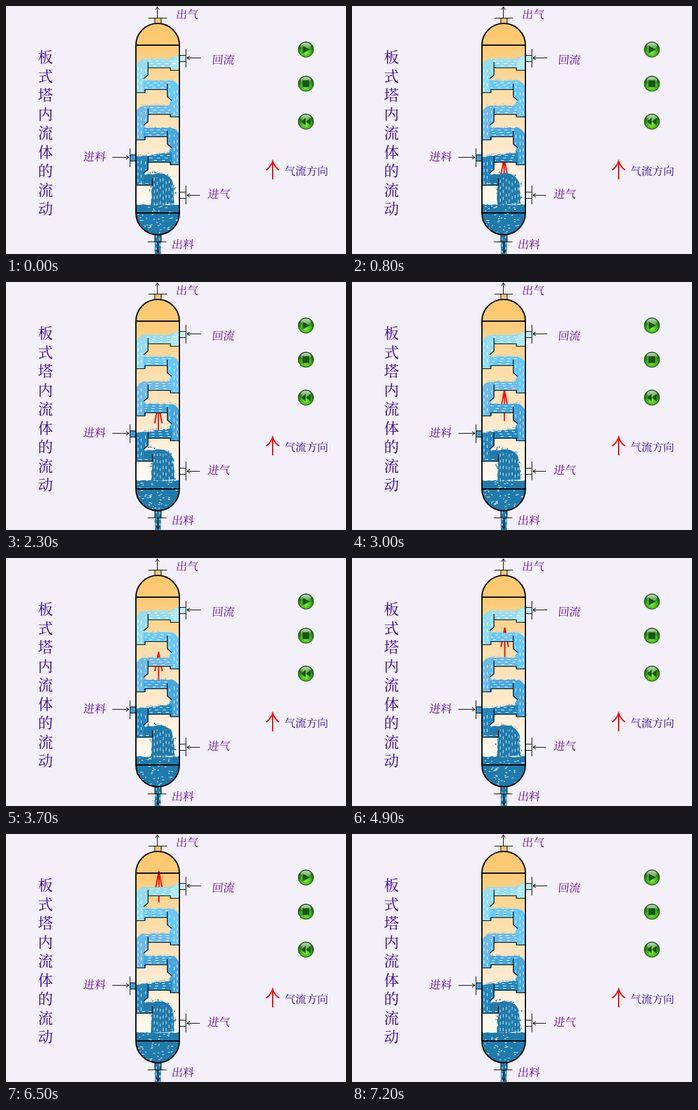
These frames come from a looping animation (547x399 px, 9600 ms). An HTML page:

```html
<!DOCTYPE html>
<html lang="zh">
<head>
<meta charset="utf-8">
<title>板式塔内流体的流动</title>
<style>
  html, body { margin: 0; width: 100%; height: 100%; overflow: hidden; background: #f3f0f9; }
  svg { display: block; width: 547px; height: 399px; }
  text { font-family: "Noto Serif CJK SC", "Noto Serif SC", "Noto Sans CJK SC", "Noto Sans CJK", serif; }
</style>
</head>
<body>
<svg id="stage" viewBox="0 0 547 399" xmlns="http://www.w3.org/2000/svg">
  <defs>
    <linearGradient id="gas" gradientUnits="userSpaceOnUse" x1="0" y1="28" x2="0" y2="320">
      <stop offset="0" stop-color="#fdc76c"/>
      <stop offset=".13" stop-color="#fdca75"/>
      <stop offset=".36" stop-color="#fddca4"/>
      <stop offset=".62" stop-color="#fee6c2"/>
      <stop offset="1" stop-color="#fffaf3"/>
    </linearGradient>
    <radialGradient id="ball" cx=".5" cy=".68" r=".6">
      <stop offset="0" stop-color="#8cf03c"/>
      <stop offset=".5" stop-color="#45b81c"/>
      <stop offset="1" stop-color="#0f5708"/>
    </radialGradient>
    <linearGradient id="gloss" x1="0" y1="0" x2="0" y2="1">
      <stop offset="0" stop-color="#fff" stop-opacity=".8"/>
      <stop offset="1" stop-color="#fff" stop-opacity=".08"/>
    </linearGradient>
    <clipPath id="vessel"><path d="M209 63A35 35 0 0 1 279 63V333A35 35 0 0 1 209 333Z"/></clipPath>
  </defs>
  <g id="nozzles">
    <rect x="239" y="19" width="11" height="11" fill="#fdc76c"/>
    <rect x="200" y="239" width="10" height="10" fill="#3a9bd3"/>
    <rect x="279" y="79" width="10" height="10" fill="#c3f1f3"/>
    <rect x="279" y="299" width="10" height="10" fill="#f8f6f6"/>
  </g>
  <g clip-path="url(#vessel)">
    <path d="M209 28H279V368H209Z" fill="url(#gas)"/>
    <path id="rise" fill="none" stroke="#f00" stroke-width="2"/>
    <g id="water"></g>
    <path id="spark" d="M245 318h2v2h-2z" fill="#e01030"/>
  </g>
  <g id="outflow"></g>
  <g id="lines" fill="none" stroke="#000"></g>
  <g id="labels"></g>
  <g id="buttons"></g>
  <path d="M429 279V250M418.500 264Q426 259 429 249.500Q432 259 439.500 264" fill="none" stroke="#f00" stroke-width="2"/>
</svg>
<script>
const NS = "http://www.w3.org/2000/svg";
const LOOP = 9600, STEP = 100, LAST = 72;
const HELD = [38, 58, 69];
const $ = id => document.getElementById(id);

function add(parent, tag, attrs, text) {
  const el = document.createElementNS(NS, tag);
  for (const k in attrs) el.setAttribute(k, attrs[k]);
  if (text) el.textContent = text;
  parent.appendChild(el);
  return el;
}

// Repeatable noise in 0..1
function rand(a, b = 0) {
  const v = Math.sin(a * 127.1 + b * 311.7 + 7.3) * 43758.5453;
  return v - Math.floor(v);
}

// t: tray level, start: bottom of the inlet side, end: bottom of the downcomer
const tiers = [
  { t: 99, start: 103, end: 139, color: "#94dcf0" },
  { t: 134, start: 139, end: 178, color: "#66c9fb" },
  { t: 174, start: 178, end: 215, color: "#6dbbe8" },
  { t: 210, start: 215, end: 255, color: "#46a8de" },
  { t: 251, start: 255, end: 289, color: "#2387be" }
];
const DEEP = "#207bab";

// Odd tiers flow to the right: mirror about the column axis
const side = (i, u) => i % 2 ? 488 - u : u;

function surface(i, u) {
  const s = tiers[i].t - 14;
  if (i === 4) return s - 1 + (264 - Math.min(u, 264)) * 0.12;
  const fall = u < 222 ? (222 - u) ** 2 / 17 : 0;
  const inlet = i === 0 && u > 262 ? (u - 262) * -0.4 : 0;
  return s + fall + inlet;
}

function tierPath(i, n) {
  const { t, start, end } = tiers[i], from = i ? 267 : 279;
  const p = [[from, start], [264, start], [264, t], [229, t], [229, t + 12], [222, t + 18],
    [225, t + 22], [i === 4 ? 235 : 225, end], [209, end]];
  for (let u = 209; u < from; u += 3)
    p.push([u, surface(i, u) + (rand(u + i * 90, n) - 0.5) * 1.8]);
  p.push([from, surface(i, from)]);
  return "M" + p.map(([u, y]) => side(i, u) + " " + y.toFixed(1)).join("L") + "Z";
}

function specks(count, n, place) {
  let d = "";
  for (let k = 0; k < count; k++) {
    const [x, y, r] = place(k, n);
    d += `M${x.toFixed(1)} ${y.toFixed(1)}h${r}v${r}h${-r}z`;
  }
  return d;
}

const water = $("water"), flows = [];

function flow(parent, d, len, gap, speed, phase) {
  const el = add(parent, "path", { d, fill: "none", stroke: "#fff", "stroke-opacity": 0.88,
    "stroke-dasharray": len + " " + gap });
  flows.push({ el, speed, phase, period: len + gap });
}

tiers.forEach((tier, i) => {
  const { t, end } = tier;
  tier.body = add(water, "path", { fill: tier.color });
  tier.spray = add(water, "path", { fill: tier.color });
  if (i === 0) add(water, "path", { d: "M279 79L271 82L265 90V103H279Z", fill: "#b5eef6", opacity: 0.75 });
  [10.5, 6.5, 2.5].forEach((up, k) =>
    flow(water, `M${side(i, i ? 265 : 278)} ${t - up}H${side(i, k ? 230 : 222)}`, 5, 6 + k, 3, k * 5 + i * 3));
  [212.5, 217.5, 224.5].forEach((u, k) =>
    flow(water, `M${side(i, u)} ${t - 5 + (2 - k) * 2}V${k === 2 ? t + 13 : end - 2}`, 5, 5 + k, 3, k * 4 + i * 2));
});

const cascade = add(water, "path", { fill: DEEP });
const drops = add(water, "path", { fill: DEEP });
const pool = add(water, "path", { fill: DEEP });
for (let k = 0; k < 7; k++)
  flow(water, `M${238.5 + k * 4.8} ${276 + Math.max(0, k - 4) * 5}V321`, 5, 5 + k % 3, 3, k * 7);
flow(water, "M212 285.500H234", 5, 5, 3, 2);
const foam = add(water, "path", { fill: "#f2faff" });

const out = $("outflow");
const jet = add(out, "path", { fill: DEEP });
flow(out, "M241.500 369V399", 4, 6, 3, 0);
flow(out, "M247.500 369V399", 4, 5, 3, 4);

const lines = $("lines");
const line = (d, w = 1) => add(lines, "path", { d, "stroke-width": w });

tiers.forEach(({ t, start }, i) => {
  const x = u => side(i, u) + (i % 2 ? 0.5 : -0.5);
  line(`M${x(229)} ${t - 9}V${t + 12}L${x(222)} ${t + 18}M${x(229)} ${t + 0.5}H${x(265)}V${start + 0.5}H${x(279)}`, 1.2);
});
line("M209 288.500H235.500V277", 1.2);
line("M209 63A35 35 0 0 1 279 63V333A35 35 0 0 1 209 333ZM209 63H279M209 333H279", 2);
line("M239.500 28V19.500M249.500 28V19.500M229 19.500H259M239.500 368V379.500M249.500 368V379.500M228 379.500H258");
line("M209 239.500H199.500M209 249.500H199.500M199.500 229V259");
[84, 304].forEach(y => line(`M280 ${y - 4.5}H289.500M280 ${y + 5.5}H289.500M289.500 ${y - 15}V${y + 15}`));

function pointer(x, y, angle, len) {
  const g = add(lines, "g", { transform: `translate(${x} ${y}) rotate(${angle})` });
  add(g, "path", { d: `M0 0H${-len}M-5 -3L0 0L-5 3` });
}
pointer(243.5, 1, -90, 18);
pointer(198, 243.5, 0, 27);
pointer(291, 83.5, 180, 23);
pointer(291, 304.5, 180, 21);
pointer(244.5, 397, 90, 18);

const labels = $("labels");
[..."板式塔内流体的流动"].forEach((c, k) =>
  add(labels, "text", { x: 63.5, y: 91 + k * 30.5, "font-size": 24, "text-anchor": "middle", fill: "#330099" }, c));
[["出气", 273, 20], ["回流", 331, 93], ["进料", 124, 249], ["进气", 324, 309], ["出料", 266, 390]].forEach(([s, x, y]) =>
  add(labels, "text", { transform: `translate(${x} ${y}) skewX(-6)`, "font-size": 18, "font-weight": 500, fill: "#660099" }, s));
add(labels, "text", { x: 448, y: 272, "font-size": 17.6, fill: "#330099" }, "气流方向");

[[70, "M477.500 64V76L489 70Z"], [125, "M477 119.500H488V130.500H477Z"], [186, "M482 180V192L474.500 186ZM490 180V192L482.500 186Z"]]
  .forEach(([y, icon]) => {
    const b = $("buttons");
    add(b, "circle", { cx: 482.5, cy: y, r: 13, fill: "#b9c8b6" });
    add(b, "circle", { cx: 482.5, cy: y, r: 12.2, fill: "url(#ball)", stroke: "#174d10" });
    add(b, "ellipse", { cx: 482.5, cy: y - 6, rx: 8.5, ry: 5, fill: "url(#gloss)" });
    add(b, "path", { d: icon, fill: "#17560b" });
  });

function drawFall(n) {
  const edge = (k, a) => (rand(k, n) - 0.5) * a;
  let d = "M222 273L228 270L236 271L244 269L254 270L262 274L267 280";
  for (let y = 286; y <= 320; y += 4) d += `L${(269 + (y - 286) / 15 + edge(y, 2)).toFixed(1)} ${y}`;
  for (let y = 320; y >= 290; y -= 4) d += `L${(233.5 + (320 - y) / 20 + edge(y + 50, 2)).toFixed(1)} ${y}`;
  cascade.setAttribute("d", d + "L235 288H222Z");

  drops.setAttribute("d", specks(30, n, k => {
    const a = rand(k, n + 1), r = 1 + Math.round(rand(k, 3));
    if (k < 16) return [227 + a * 39, 268 + a * a * 9 - rand(k, n + 9) * 4, r];
    if (k < 23) return [230 + rand(k, n + 4) * 6, 289 + a * 12, r];
    return [268 + rand(k, n + 5) * 4, 282 + a * 35, r];
  }));

  let p = "M209 368V319";
  for (let x = 212; x <= 279; x += 3) p += `L${x} ${(319.5 + edge(x, 1.6)).toFixed(1)}`;
  pool.setAttribute("d", p + "V368Z");

  let f = "";
  for (let k = 0; k < 52; k++) {
    const x = 211 + rand(k, 1) * 65 + rand(k, n) * 2;
    const y = 321 + (rand(k, 2) * 44 + n * 1.5) % 44;
    const w = k % 3 ? 3 : 1.6, h = k % 3 ? 1 : 1.6;
    f += `M${x.toFixed(1)} ${y.toFixed(1)}h${w}v${h}h${-w}z`;
  }
  foam.setAttribute("d", f);

  let j = "M240 368V380";
  for (let y = 382; y <= 400; y += 3) j += `L${(239.5 + edge(y, 1)).toFixed(1)} ${y}`;
  for (let y = 400; y >= 382; y -= 3) j += `L${(249 + edge(y + 9, 1)).toFixed(1)} ${y}`;
  jet.setAttribute("d", j + "L249 380V368Z");
}

function draw(n) {
  tiers.forEach((tier, i) => {
    tier.body.setAttribute("d", tierPath(i, n));
    tier.spray.setAttribute("d", specks(i === 4 ? 18 : 11, n, k => {
      const u = 212 + rand(k + i * 20, n) * 53;
      return [side(i, u), surface(i, u) - 1 - rand(k, n + i) * 2.5, 1];
    }));
  });
  drawFall(n);
  flows.forEach(f => f.el.setAttribute("stroke-dashoffset", -((n * f.speed + f.phase) % f.period)));

  const moving = n < LAST;
  const x = 244.5 + Math.min(1.5, n * 0.026), y = 271.25 - 3.25 * n;
  $("rise").setAttribute("d", moving ? `M${x} ${y}v50M${x - 6} ${y + 31}L${x} ${y}L${x + 6} ${y + 31}` : "");
  $("spark").setAttribute("visibility", moving ? "hidden" : "visible");
}

let shown = -1;
function tick() {
  let n = Math.min(LAST, Math.floor(performance.now() % LOOP / STEP));
  if (HELD.includes(n)) n--;
  if (n !== shown) draw(shown = n);
  requestAnimationFrame(tick);
}
tick();
</script>
</body>
</html>
```
